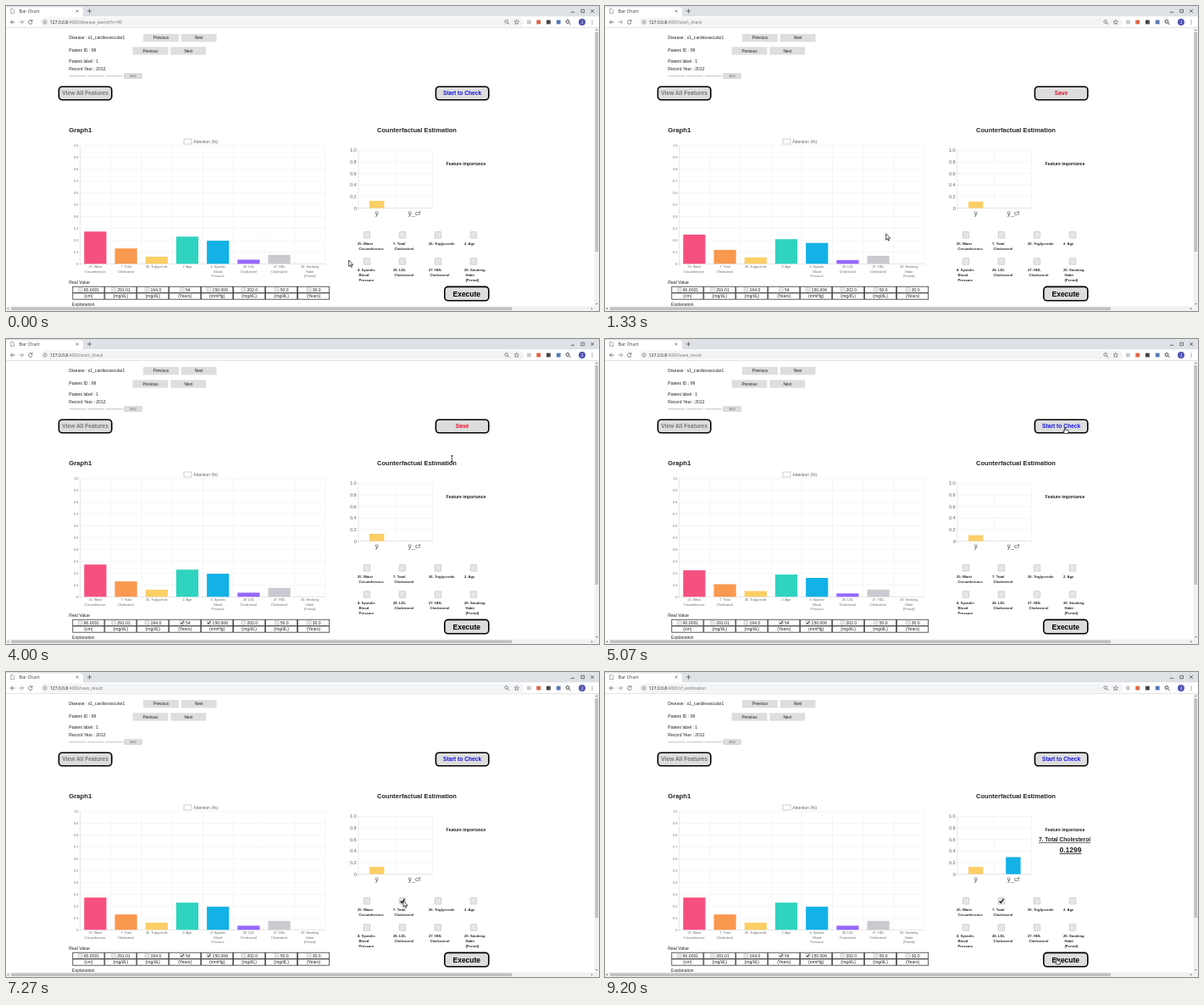
An HTML page for the animation above (9.27 s loop, 700x360 px).

```html
<!DOCTYPE html>
<html lang="en">
<head>
<meta charset="utf-8">
<title>Bar Chart</title>
<style>
  html, body { margin: 0; width: 100%; height: 100%; overflow: hidden; background: #fff; }
  svg { display: block; width: 700px; height: 360px; }
  text { font-family: "Liberation Sans", Arial, sans-serif; white-space: pre; }
  .ui { font-family: "Noto Sans", sans-serif; }
</style>
</head>
<body>
<svg id="stage" viewBox="0 0 700 360"></svg>
<script>
const LOOP = 9270;
const stage = document.getElementById('stage');

function add(tag, attrs, parent = stage) {
  const node = document.createElementNS('http://www.w3.org/2000/svg', tag);
  for (const key in attrs) node.setAttribute(key, attrs[key]);
  parent.appendChild(node);
  return node;
}
const rect = (x, y, width, height, fill, more) => add('rect', { x, y, width, height, fill, ...more });
const path = (d, stroke, width = 1, more) =>
  add('path', { d, stroke, fill: 'none', 'stroke-width': width, ...more });
const circle = (cx, cy, r, fill, more) => add('circle', { cx, cy, r, fill, ...more });
function text(x, y, string, size, more) {
  const node = add('text', { x, y, 'font-size': size, fill: '#222', ...more });
  node.textContent = string;
  return node;
}
const MIDDLE = { 'text-anchor': 'middle' };
const BOLD = { 'font-weight': 700 };
const CENTER_BOLD = { ...MIDDLE, ...BOLD };
const show = (node, on) => node.setAttribute('visibility', on ? 'visible' : 'hidden');

// Browser frame
function drawBrowser() {
  rect(0, 0, 700, 12.5, '#dee1e6');
  path('M0 12.5V1.5H88Q91 1.5 91 5V12.5Z', 'none', 0, { fill: '#fff' });
  path('M5.7 3.5h2.6l1.4 1.4v3.8h-4z', '#777', .6);
  text(15.5, 8, 'Bar Chart', 5.4, { class: 'ui', fill: '#444' });
  path('M82.8 4.6l2.8 2.8m0-2.8l-2.8 2.8', '#555', .7);
  path('M96 6h5m-2.5-2.5v5', '#555', .8);
  path('M667 7.3h4M690.3 4.2l3.6 3.6m0-3.6l-3.6 3.6', '#444', .8);
  rect(679, 4.2, 3.6, 3.6, 'none', { stroke: '#444', 'stroke-width': .7 });

  rect(0, 12.5, 700, 13, '#fff');
  rect(41, 13.8, 570, 10.4, '#f3f4f5', { rx: 5.2 });
  path('M10.5 19H5.5m2.3-2.3L5.5 19l2.3 2.3', '#555', .8);
  path('M15.5 19h5m-2.3-2.3l2.3 2.3-2.3 2.3', '#888', .8);
  path('M30.6 17.5a2.3 2.3 0 1 0 .5 2M31 16.2v1.8h-1.8', '#555', .8);
  circle(46, 19, 2.1, 'none', { stroke: '#666', 'stroke-width': .6 });
  path('M46 18.7v1.5M46 17.6v.5', '#666', .6);
  path('M592.2 19.9l1.7 1.7', '#555', .9);
  circle(590.7, 18.4, 1.8, 'none', { stroke: '#555', 'stroke-width': .7 });
  path('M602.7 16.2l.8 1.9 2 .1-1.6 1.3.6 2-1.8-1.1-1.8 1.1.6-2-1.6-1.3 2-.1z', '#555', .6);
  [[615, '#c9cbd0'], [626.3, '#dd6545'], [638, '#444'], [649.8, '#5578b8']]
    .forEach(([x, fill]) => rect(x, 16.6, 4.8, 4.8, fill));
  path('M664.6 20l1.9 1.9', '#333', 1);
  circle(663, 18.4, 1.9, 'none', { stroke: '#333', 'stroke-width': .9 });
  circle(680, 19, 4, '#5054b0');
  text(680, 20.7, 'J', 4.5, { ...MIDDLE, fill: '#fff' });
  [17, 19, 21].forEach(y => circle(692, y, .6, '#555'));
  path('M0 25.5H700', '#dcdcdc', .8);
}

function drawScrollbars() {
  rect(694.5, 26, 5.5, 334, '#f1f1f1');
  rect(0, 354.5, 700, 5.5, '#f1f1f1');
  rect(695.4, 31, 3.7, 259, '#c1c1c1');
  rect(6, 355.4, 591, 3.7, '#c1c1c1');
  path('M696 29l1.3-1.5 1.3 1.5zM696 351l1.3 1.5 1.3-1.5zM3 356l-1.5 1.3 1.5 1.3zM691 356l1.5 1.3-1.5 1.3z',
    'none', 0, { fill: '#666' });
}

// Page controls
function flatButton(x, y, label) {
  rect(x, y, 41.8, 9.3, '#dedede');
  text(x + 20.9, y + 6.2, label, 4.7, MIDDLE);
}
function bigButton(x, y, width, height, label, size, fill) {
  rect(x, y, width, height, '#dddddd', { rx: 4, stroke: '#000', 'stroke-width': 1.6 });
  return text(x + width / 2, y + height / 2 + size * .35, label, size, { ...CENTER_BOLD, fill });
}
function checkbox(cx, cy, size) {
  const half = size / 2, u = size / 8;
  rect(cx - half, cy - half, size, size, '#e6e6e6', { stroke: '#bbb', 'stroke-width': .6, rx: .6 });
  const tick = path(`M${cx - 2.5 * u} ${cy + .2 * u}l${1.8 * u} ${2 * u}L${cx + 2.7 * u} ${cy - 2.6 * u}`, '#222', 1.6 * u);
  show(tick, false);
  return tick;
}

function drawHeader() {
  ['Disease : s1_cardiovascular1', 'Patient ID : 99', 'Patient label : 1', 'Record Year : 2012']
    .forEach((line, i) => text(74.3, [39, 54.2, 67, 76.3][i], line, 5.05));
  flatButton(162, 33, 'Previous');
  flatButton(206.7, 33, 'Next');
  flatButton(149.6, 48.3, 'Previous');
  flatButton(194.4, 48.3, 'Next');
  path('M74.5 82.7H140', '#aaa', .7, { 'stroke-dasharray': '20 1.6' });
  rect(139.8, 79.8, 20.4, 5.6, '#dedede', { stroke: '#bbb', 'stroke-width': .5 });
  text(150, 83.8, '2012', 3.4, { ...MIDDLE, fill: '#555' });
  bigButton(62.4, 95.2, 62.4, 15.6, 'View All Features', 6.65, '#777');
  text(74.3, 149, 'Graph1', 7.7, BOLD);
  text(485, 149, 'Counterfactual Estimation', 7.55, CENTER_BOLD);
  text(543, 188, 'Feature importance', 5.05, CENTER_BOLD);
}

// Charts
const bars = [];
function bar(x, base, width, height, fill) {
  const node = rect(x, base, width, 0, fill);
  bars.push({ node, base, height });
  return node;
}
function axes(left, right, top, base, rows, columns, size) {
  const step = (base - top) / rows;
  for (let i = 0; i <= rows; i++) {
    const y = base - i * step, value = i / rows;
    path(`M${left - 2} ${y}H${right}`, i ? '#eeeeee' : '#d0d0d0', .6);
    text(left - 2.2, y + size * .35, value ? value.toFixed(1) : '0', size, { 'text-anchor': 'end', fill: '#666' });
  }
  for (let i = 0; i <= columns; i++)
    path(`M${left + (right - left) * i / columns} ${top}V${base + 2}`, i ? '#f0f0f0' : '#d8d8d8', .6);
}

const features = [
  { label: '25. Waist|Circumference', value: '90.0031', unit: '(cm)', share: .273, color: '#f5507f' },
  { label: '7. Total|Cholesterol', value: '291.01', unit: '(mg/dL)', share: .13, color: '#f9984f' },
  { label: '26. Triglyceride', value: '194.0', unit: '(mg/dL)', share: .06, color: '#fbce66' },
  { label: '2. Age', value: '54', unit: '(Years)', share: .23, color: '#2fd3bf' },
  { label: '4. Systolic|Blood|Pressure', value: '150.006', unit: '(mmHg)', share: .195, color: '#12b1e6' },
  { label: '28. LDL|Cholesterol', value: '202.0', unit: '(mg/dL)', share: .035, color: '#9668fb' },
  { label: '27. HDL|Cholesterol', value: '50.0', unit: '(mg/dL)', share: .075, color: '#c9cad0' },
  { label: '20. Smoking|Habit|(Period)', value: '30.0', unit: '(Years)', share: 0, color: '#ccc' },
];

function drawAttention() {
  rect(210, 157, 9, 6, '#fff', { stroke: '#bbb', 'stroke-width': .7 });
  text(221.3, 161.8, 'Attention (%)', 5, { fill: '#666' });
  axes(87.5, 377, 164.8, 304.3, 10, 8, 3.7);
  features.forEach(({ label, share, color }, i) => {
    const center = 105.4 + 36.2 * i;
    bar(center - 13.1, 304.3, 26.2, share * 139.5, color);
    label.split('|').forEach((line, n) =>
      text(center, 309.4 + 5.2 * n, line, 3.8, { ...MIDDLE, fill: '#666' }));
  });
}

function drawTable() {
  text(74.3, 327.6, 'Real Value', 5.1);
  text(78, 354, 'Explanation', 5.1);
  return features.map(({ value, unit }, i) => {
    const x = 78.4 + 37.95 * i, center = x + 19;
    for (const y of [331.2, 338.9])
      rect(x + .4, y, 37.2, 7.3, '#fff', { stroke: '#333', 'stroke-width': .8 });
    const label = text(center + 3.6, 336.8, value, 5.1, MIDDLE);
    text(center, 344.4, unit, 5.1, MIDDLE);
    return checkbox(center - .4 - label.getComputedTextLength() / 2, 334.8, 5);
  });
}

function drawEstimate() {
  axes(416, 503.5, 170.5, 238.6, 5, 2, 5.7);
  bar(429, 238.6, 17.4, 8.6, '#fbce66');
  text(437.7, 246.5, 'ŷ', 7.9, { ...MIDDLE, fill: '#555' });
  text(482, 246.5, 'ŷ_cf', 7.9, { ...MIDDLE, fill: '#555' });
  const result = bar(473.2, 238.6, 17.4, 20.1, '#12b1e6');
  const underline = { ...CENTER_BOLD, 'text-decoration': 'underline' };
  return [result,
    text(542.5, 200, '7. Total Cholesterol', 6.65, underline),
    text(549.5, 213, '0.1299', 8.5, underline)];
}

function drawChoices() {
  return features.map(({ label }, i) => {
    const x = 415 + 42 * (i % 4), y = 270.3 + 31.2 * Math.floor(i / 4);
    label.split('|').forEach((line, n) =>
      text(x + (n ? 1.4 : 0), y + 11.4 + 5.9 * n, line, 4.2, BOLD));
    return checkbox(x + 11, y, 7.6);
  });
}

drawHeader();
drawAttention();
const tableTicks = drawTable();
const estimate = drawEstimate();
const choiceTicks = drawChoices();
const action = bigButton(507.4, 95.2, 62.4, 15.6, '', 6.65);
bigButton(517.8, 331.4, 52, 16.4, 'Execute', 8.5, '#000');
drawScrollbars();
drawBrowser();
const url = text(52, 20.9, '', 5, { class: 'ui', fill: '#777' });
add('tspan', { fill: '#222' }, url).textContent = '127.0.0.8';
const route = add('tspan', {}, url);

// Mouse pointers, each with its hot spot at 0,0
const pointers = {
  arrow: 'M0 0V7.4L1.7 5.9 2.8 8.4 3.9 7.9 2.8 5.5H5Z',
  hand: 'M-.6 0Q0-.7.6 0V2.6L3.6 3.2Q4.4 3.5 4.2 4.5L3.6 7H-.3L-2.4 4.2Q-2.2 3.3-.6 4.4Z',
  beam: 'M-1.4-3.4H1.4M0-3.4V3.4M-1.4 3.4H1.4',
};
for (const name in pointers)
  pointers[name] = path(pointers[name], '#222', .8, { fill: name === 'beam' ? 'none' : '#fff' });

const track = [
  [0, 404.7, 300], [330, 543, 104.5], [950, 543, 104.5], [1330, 332, 268.5],
  [2100, 207.3, 334.5], [2600, 207.3, 334.5], [2950, 239, 334.7], [3600, 239, 334.7],
  [4000, 526, 141.5], [4300, 543, 104.5], [5470, 543, 104.5], [6500, 469, 270],
  [7340, 469, 270], [7900, 533.5, 338], [LOOP, 533.5, 338],
];
// Slope at a key: zero where the mouse rests
function slope(i, axis) {
  const before = track[i - 1], here = track[i], after = track[i + 1];
  if (!before || !after || before[1] === here[1] || after[1] === here[1]) return 0;
  return (after[axis] - before[axis]) / (after[0] - before[0]);
}
function mouseAt(time) {
  const i = track.findIndex((key, n) => n === track.length - 2 || track[n + 1][0] > time);
  const a = track[i], b = track[i + 1], span = b[0] - a[0], u = (time - a[0]) / span;
  const blend = u * u * (3 - 2 * u);
  return [1, 2].map(axis => a[axis] + (b[axis] - a[axis]) * blend
    + span * u * (1 - u) * ((1 - u) * slope(i, axis) - u * slope(i + 1, axis)));
}
const inside = (x, y, left, top, right, bottom) => x > left && x < right && y > top && y < bottom;

const pages = [
  { start: -1000, route: 'disease_search?n=99', action: 'Start to Check' },
  { start: 885, route: 'start_check', action: 'Save' },
  { start: 4722, route: 'save_result', action: 'Start to Check' },
  { start: 8211, route: 'cf_estimation', action: 'Start to Check' },
];

function draw(time) {
  const page = pages.filter(p => p.start <= time).pop();
  route.textContent = ':4000/' + page.route;
  action.textContent = page.action;
  action.setAttribute('fill', page.action === 'Save' ? '#e8102a' : '#1414e6');

  const grown = 1 - (1 - Math.min(1, (time - page.start) / 1000)) ** 4;
  for (const { node, base, height } of bars) {
    node.setAttribute('y', base - height * grown);
    node.setAttribute('height', height * grown);
  }
  estimate.forEach(node => show(node, page === pages[3]));
  show(tableTicks[3], time >= 2450);
  show(tableTicks[4], time >= 3200);
  show(choiceTicks[1], time >= 6850);

  const [x, y] = mouseAt(time);
  const overButton = inside(x, y, 507, 95, 570, 111) || inside(x, y, 517, 331, 570, 348);
  const shape = overButton ? 'hand' : inside(x, y, 438, 141, 533, 151) ? 'beam' : 'arrow';
  for (const name in pointers) show(pointers[name], name === shape);
  pointers[shape].setAttribute('transform', `translate(${x} ${y})`);
}

function tick() {
  draw(performance.now() % LOOP);
  requestAnimationFrame(tick);
}
tick();
</script>
</body>
</html>
```
